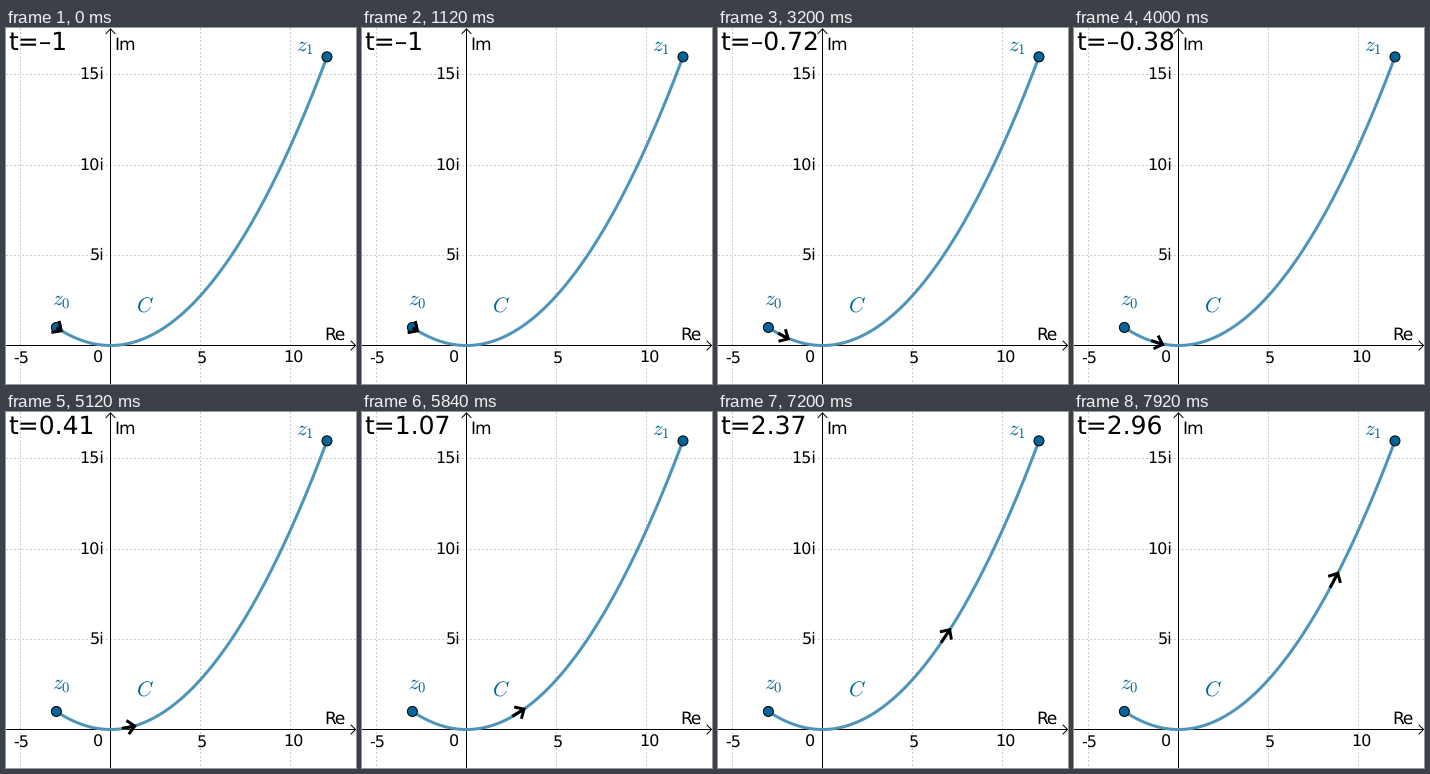
Write a matplotlib script that moves like this. It is 350 by 356 pixels and loops after 8 s.

```python
import numpy as np
import matplotlib.pyplot as plt
from matplotlib.animation import FuncAnimation
from matplotlib.patches import Circle

plt.rcParams.update({"font.family": "DejaVu Sans", "mathtext.fontset": "cm",
                     "text.hinting": "none", "text.hinting_factor": 1})

WIDTH, HEIGHT, DPI = 350, 356, 100
FRAMES, INTERVAL = 100, 80
PT = 72 / DPI
ORIGIN = np.array([104.5, 317.5])
UNIT = 18.04
BLUE = "#006699"
T_START, T_END = -1, 4
BARB, BARB_ANGLE = 10, np.radians(44)


def to_pixels(re, im):
    return np.array([ORIGIN[0] + UNIT * re, ORIGIN[1] - UNIT * im])


def path(t):
    return to_pixels(3 * t, t ** 2)


def parameter(frame):
    """Doubly eased sweep of t along the curve."""
    eased = (1 - np.cos(0.02 * frame)) / 2
    return T_START + (T_END - T_START) * (1 - np.cos(np.pi * eased)) / 2


def arrow_shape(t):
    """Return the shaft and the head of the arrow as pixel points."""
    s = max(t - 0.15, T_START)
    heading = np.arctan2(-2 * s, 3)
    forward = np.array([np.cos(heading), np.sin(heading)])
    tip = path(t) + forward * (2 - 4.5 * np.tanh(0.9 * (t - 0.4)))
    length = min(12.5 + 1.3 * t, np.hypot(*(tip - path(T_START))))
    tail = tip - forward * length
    left, right = (tip - BARB * np.array([np.cos(a), np.sin(a)])
                   for a in (heading + BARB_ANGLE, heading - BARB_ANGLE))
    return np.array([tail, tip]), np.array([left, tip, right])


fig = plt.figure(figsize=(WIDTH / DPI, HEIGHT / DPI), dpi=DPI, facecolor="white")
ax = fig.add_axes([0, 0, 1, 1])
ax.set_xlim(0, WIDTH)
ax.set_ylim(HEIGHT, 0)
ax.axis("off")


def line(xs, ys, width=1, color="black", **style):
    return ax.plot(xs, ys, color=color, lw=width * PT, snap=False, **style)[0]


def label(x, y, text, size, color="black", ha="left"):
    return ax.text(x, y, text, fontsize=size * PT, color=color, ha=ha,
                   va="baseline", zorder=4)


# Grid and axes
grid = dict(color="#cccccc", dashes=(2, 2), zorder=0)
for re in (-5, 5, 10):
    x = np.floor(to_pixels(re, 0)[0]) + 0.5
    line([x, x], [0, HEIGHT], **grid)
for im in (5, 10, 15):
    y = np.floor(to_pixels(0, im)[1]) + 0.5
    line([0, WIDTH], [y, y], **grid)
    label(98.5, y + 4.6, f"{im}i", 16, ha="right")

ox, oy = ORIGIN
line([0, WIDTH], [oy, oy])
line([ox, ox], [1, HEIGHT])
line([345, 349.5, 345], [oy - 4.5, oy, oy + 4.5])
line([ox - 4.5, ox, ox + 4.5], [5.5, 1, 5.5])
for x, text in ((15, "-5"), (92.5, "0"), (196.3, "5"), (287.8, "10")):
    label(x, 335, text, 16, ha="center")
label(108.5, 22, "Im", 17.5)
label(318.5, 312, "Re", 17.5)

# Curve with its end points
line(*path(np.linspace(T_START, T_END, 200)), width=3, color="#4d94b8", zorder=2)
for end in (T_START, T_END):
    ax.add_patch(Circle(path(end), 5, fc=BLUE, ec="black", lw=PT, zorder=3))
label(46.5, 277, "$z_0$", 21, BLUE)
label(289.5, 22, "$z_1$", 21, BLUE)
label(130, 285, "$C$", 21, BLUE)

# Moving parts
readout = label(2, 22, "", 25.2)
shaft = line([], [], 3, zorder=5, solid_capstyle="butt")
head = line([], [], 3, zorder=5, solid_capstyle="butt", solid_joinstyle="miter")


def update(frame):
    t = parameter(frame)
    readout.set_text(f"t={round(t, 2) + 0:g}".replace("-", "\u2013"))
    for artist, points in zip((shaft, head), arrow_shape(t)):
        artist.set_data(*points.T)
    return readout, shaft, head


anim = FuncAnimation(fig, update, frames=FRAMES, interval=INTERVAL,
                     repeat=True, repeat_delay=0, blit=False)
plt.show()
```
